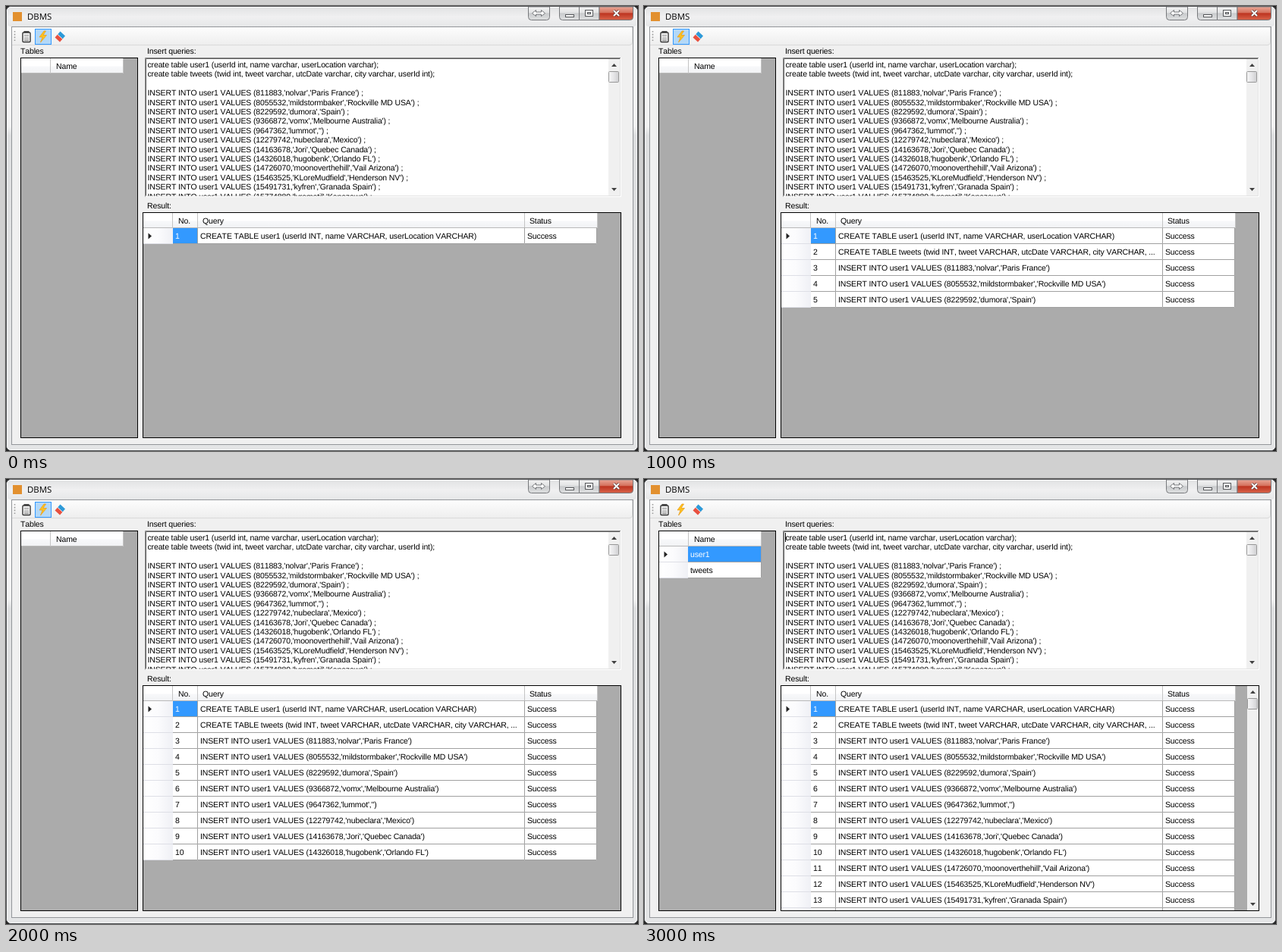
These frames come from a looping animation (833 by 587 pixels, 3200 ms). An HTML page:

```html
<!DOCTYPE html>
<html lang="en">
<head>
<meta charset="utf-8">
<title>DBMS</title>
<style>
  html, body { margin: 0; height: 100%; overflow: hidden; background: #222; }
  svg { display: block; }
  text {
    font: 10.5px "Liberation Sans", Arial, sans-serif;
    letter-spacing: -.14px;
    font-kerning: none;
    text-rendering: geometricPrecision;
  }
  text.title { font: 11.4px "Open Sans", "Noto Sans", sans-serif; letter-spacing: 0; }
</style>
</head>
<body>
<script>
const STEP = 200, STEPS = 16, ROW = 21, LINE = 12.4;

const users = [
  [811883, 'nolvar', 'Paris France'],
  [8055532, 'mildstormbaker', 'Rockville MD USA'],
  [8229592, 'dumora', 'Spain'],
  [9366872, 'vomx', 'Melbourne Australia'],
  [9647362, 'lummot', ''],
  [12279742, 'nubeclara', 'Mexico'],
  [14163678, 'Jori', 'Quebec Canada'],
  [14326018, 'hugobenk', 'Orlando FL'],
  [14726070, 'moonoverthehill', 'Vail Arizona'],
  [15463525, 'KLoreMudfield', 'Henderson NV'],
  [15491731, 'kyfren', 'Granada Spain'],
  [15774880, 'lyrometil', 'Kanazawa'],
];
const inserts = users.map(([id, name, place]) => `INSERT INTO user1 VALUES (${id},'${name}','${place}')`);
const script = [
  'create table user1 (userId int, name varchar, userLocation varchar);',
  'create table tweets (twid int, tweet varchar, utcDate varchar, city varchar, userId int);',
  '',
  ...inserts.map(q => q + ' ;'),
];
const results = [
  'CREATE TABLE user1 (userId INT, name VARCHAR, userLocation VARCHAR)',
  'CREATE TABLE tweets (twid INT, tweet VARCHAR, utcDate VARCHAR, city VARCHAR, ...',
  ...inserts,
];

const box = (x, y, w, h, fill, extra = '') =>
  `<rect x="${x}" y="${y}" width="${w}" height="${h}" fill="${fill}" ${extra}/>`;
const path = (d, fill, extra = '') => `<path d="${d}" fill="${fill}" ${extra}/>`;
const line = (d, stroke, extra = '') => path(d, 'none', `stroke="${stroke}" ${extra}`);
const text = (x, y, s, fill = '#000', extra = '') => `<text x="${x}" y="${y}" fill="${fill}" ${extra}>${s}</text>`;
const group = (id, body) => `<g id="${id}">${body}</g>`;
const view = (x, y, w, h, body) =>
  `<svg x="${x}" y="${y}" width="${w}" height="${h}" viewBox="${x} ${y} ${w} ${h}">${body}</svg>`;
const gradient = (id, dir, ...stops) =>
  `<linearGradient id="${id}" x2="${dir === 'h' ? 1 : 0}" y2="${dir === 'h' ? 0 : 1}">` +
  stops.map(([at, c]) => `<stop offset="${at}" stop-color="${c}"/>`).join('') + '</linearGradient>';

const scrollbar = (x, y, h, thumb) =>
  box(x, y, 15, h, '#f0f0f0') +
  path(`M${x + 4} ${y + 10}l3.5 -4l3.5 4z`, '#404040') +
  path(`M${x + 4} ${y + h - 10}l3.5 4l3.5 -4z`, '#404040') +
  box(x + .5, y + 16.5, 13, thumb, 'url(#thumb)', 'stroke="#979797" rx="1"');

const header = (x, y, right, columns) =>
  box(x, y, right - x, 20, 'url(#head)') +
  line(`M${x} ${y + 19.5}H${right}`, '#b9b9b9') +
  columns.map(([cx, tx, label]) =>
    line(`M${cx + .5} ${y}v20`, '#c4c4c4') + text(tx, y + 14, label)).join('') +
  line(`M${right - .5} ${y}v20`, '#c4c4c4');

const rowHead = (x, y, w, current) =>
  box(x, y, w, ROW, 'url(#rowHead)') +
  line(`M${x} ${y + 20.5}h${w}`, '#dedfe6') +
  (current ? path(`M${x + 6.5} ${y + 6.5}l4.5 4l-4.5 4z`, '#222') : '');

const cell = (x, y, w, label, selected) =>
  box(x, y, w, ROW, selected ? '#3399ff' : '#fff') +
  line(`M${x} ${y + 20.5}h${w - .5}v-21`, '#a0a0a0') +
  text(x + 3, y + 14, label, selected ? '#fff' : '#000');

const resultRow = (query, i) => {
  const y = 293 + i * ROW;
  return group('row' + i,
    rowHead(181, y, 39, i === 0) + cell(220, y, 33, i + 1, i === 0) +
    cell(253, y, 431, query) + cell(684, y, 95, 'Success'));
};

const defs = '<defs>' +
  gradient('frame', 'v', [0, '#fafafa'], [.27, '#f3f3f3'], [.29, '#dedfe0'], [1, '#e4e5e6']) +
  gradient('caption', 'v', [0, '#e2e3e4'], [.5, '#f0f0f1'], [1, '#e6e7e8']) +
  gradient('tool', 'v', [0, '#fdfdfd'], [1, '#eeeeee']) +
  gradient('head', 'v', [0, '#fff'], [.5, '#fff'], [.55, '#f7f8fa'], [1, '#f1f2f4']) +
  gradient('rowHead', 'h', [0, '#fff'], [.5, '#fbfbfd'], [1, '#eff0f5']) +
  gradient('thumb', 'h', [0, '#f6f6f6'], [.5, '#e6e6e8'], [1, '#cfcfd1']) +
  gradient('button', 'v', [0, '#f4f4f4'], [.45, '#e2e3e4'], [.5, '#c9cbcd'], [1, '#dfe0e1']) +
  gradient('close', 'v', [0, '#e9a797'], [.45, '#d4705c'], [.5, '#bd3420'], [1, '#d8634a']) +
  '</defs>';

const captionButton = (d, fill) => path(d, `url(#${fill})`, 'stroke="#77797c"');

const frame =
  box(.5, .5, 832, 586, 'url(#frame)', 'rx="6" stroke="#4b4d50"') +
  box(1.5, 1.5, 830, 584, 'none', 'rx="5" stroke="#fff" stroke-opacity=".8"') +
  box(2, 2, 829, 25, 'url(#caption)', 'rx="4"') +
  box(9, 8, 12, 12, '#e2902f') +
  text(28, 18, 'DBMS', '#000', 'class="title"') +
  captionButton('M688.5 1V14.5q0 4 4 4H712.5q4 0 4 -4V1z', 'button') +
  path('M693.5 9.5l5 -4v2.5h7v-2.5l5 4l-5 4v-2.5h-7v2.5z', '#fff', 'stroke="#66686b" stroke-width=".9"') +
  captionButton('M729.5 1V14.5q0 4 4 4H755.5V1z', 'button') +
  captionButton('M755.5 1V18.5H782V1z', 'button') +
  captionButton('M782 1V18.5H822.5q4 0 4 -4V1z', 'close') +
  box(737.5, 11.5, 11, 3, '#fff', 'stroke="#55575a"') +
  box(763.5, 5.5, 10, 8, '#fff', 'stroke="#55575a"') +
  box(766.5, 8.5, 4, 2, '#d0d1d3', 'stroke="#55575a"') +
  line('M801 6l7 7M808 6l-7 7', '#5f3a38', 'stroke-width="3.6"') +
  line('M801 6l7 7M808 6l-7 7', '#fff', 'stroke-width="2.1"') +
  box(7.5, 27.5, 819, 551, '#f0f0f0', 'stroke="#93969a"');

const toolbar =
  path('M8 28H826V51H12q-4 0 -4 -4z', 'url(#tool)') +
  line('M8 51.5H822q3.500 0 3.500 -4V28', '#d9d9d9') +
  line('M11.500 33v15', '#9a9a9a', 'stroke-width="1.600" stroke-dasharray="1.600 2.200"') +
  group('running', box(38.5, 30.5, 21, 20, '#b3d8f8', 'stroke="#3399ff"')) +
  box(22, 35, 10, 12.5, '#fff', 'stroke="#333" stroke-width="1.400" rx="1"') +
  line('M24 38.5h6M24 41h6M24 43.500h6M24 45.500h6', '#777', 'stroke-width=".9"') +
  box(23.500, 33, 7, 2.500, '#444') +
  path('M50 33l-6 8h4l-2.500 7l8 -9.500h-4.500l3.500 -5.500z', '#ffc21c', 'stroke="#e79a1c" stroke-width=".7"') +
  path('M71.500 33.500l6.500 6l-3.500 4l-6.500 -6z', '#2d9ad8') +
  path('M68 37.500l6.500 6l-3.500 4l-6.500 -6z', '#e8503f') +
  line('M68 37.500l6.500 6', '#fff', 'stroke-width=".8"');

const tables =
  text(19, 63, 'Tables') +
  box(19.5, 68.5, 154, 501, '#ababab', 'stroke="#000"') +
  header(20, 69, 155, [[58, 66, 'Name']]) +
  group('tables', ['user1', 'tweets'].map((name, i) => {
    const y = 89 + i * ROW;
    return rowHead(20, y, 38, i === 0) + cell(58, y, 97, name, i === 0);
  }).join(''));

const editor =
  text(186, 63, 'Insert queries:') +
  box(183, 68, 628, 184, '#fff') +
  line('M183.500 251.500V68.500H810', '#8a8a8a') +
  line('M184.500 250V69.500H809', '#5e5e5e') +
  line('M184 250.500H809.500V69', '#e3e3e3') +
  view(185, 70, 609, 180.5, script.map((s, i) => text(186.5, 81 + i * LINE, s)).join('')) +
  scrollbar(794, 70, 180, 14) +
  group('caret', box(186, 71, 1, 12, '#000'));

const resultGrid =
  text(186, 267, 'Result:') +
  box(180.5, 272.5, 630, 297, '#ababab', 'stroke="#000"') +
  view(181, 273, 629, 296,
    header(181, 273, 780, [[219, 227, 'No.'], [252, 259, 'Query'], [683, 690, 'Status']]) +
    results.map(resultRow).join('') +
    group('firstScroll', scrollbar(795, 273, 296, 245)) +
    group('fullScroll', scrollbar(795, 273, 296, 14)));

document.body.innerHTML =
  `<svg width="833" height="587" viewBox="0 0 833 587">${defs}${frame}${toolbar}${tables}${editor}${resultGrid}</svg>`;

const show = (id, on) => document.getElementById(id).setAttribute('display', on ? 'inline' : 'none');

function draw(now) {
  const step = Math.floor(now / STEP) % STEPS;
  const count = step < 4 ? step + 1 : step; // one query takes two steps
  const done = step === STEPS - 1;
  results.forEach((_, i) => show('row' + i, i < count));
  show('running', !done);
  show('firstScroll', !done && count > 13);
  for (const id of ['fullScroll', 'tables', 'caret']) show(id, done);
  requestAnimationFrame(draw);
}
draw(performance.now());
</script>
</body>
</html>
```
